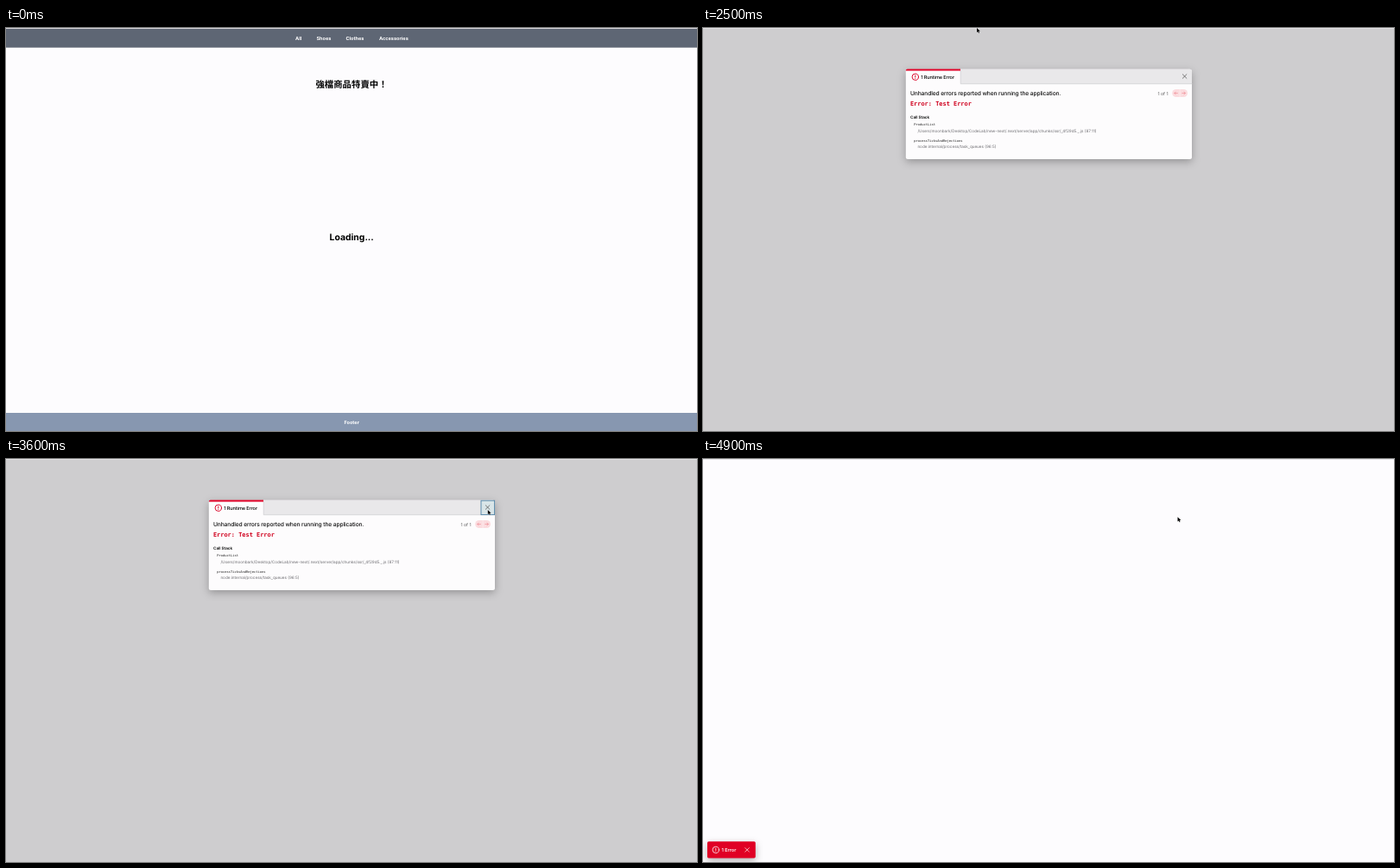
An HTML page for the animation above (5 s loop, 800 px wide and 467 px high).

```html
<!DOCTYPE html>
<html lang="zh-Hant">
<head>
<meta charset="utf-8">
<title>Error overlay</title>
<style>
  html, body { margin: 0; width: 100%; height: 100%; overflow: hidden; background: #fdfcfe; }
  svg { display: block; width: 800px; height: 467px; }
  text { font-family: Inter, sans-serif; text-rendering: geometricPrecision; white-space: pre; }
  .nav { font-size: 5.6px; font-weight: 700; fill: #fff; }
  .title { font: 700 10.4px "Noto Sans CJK TC", "Noto Sans CJK", sans-serif; }
  .loading { font-size: 10.4px; font-weight: 700; }
  .mid { text-anchor: middle; }
  .tab { font-size: 5.6px; font-weight: 500; letter-spacing: -.02em; }
  .lead { font-size: 6.7px; font-weight: 500; letter-spacing: -.02em; fill: #111; }
  .mono { font-family: "DejaVu Sans Mono", monospace; font-size: 3.75px; fill: #222; }
  .error { font-family: "DejaVu Sans Mono", monospace; font-size: 6.94px; font-weight: 700; fill: #d0021f; }
  .stack { font-size: 4.6px; font-weight: 600; }
  .path { font-size: 4.62px; fill: #6c6c70; }
  .count { font-size: 5.1px; fill: #555; }
  .toast { font-size: 5.5px; font-weight: 600; fill: #fff; }
  .line { fill: none; stroke-linecap: round; stroke-linejoin: round; }
  .panel { filter: drop-shadow(0 3px 5px rgba(0, 0, 0, .28)); }
  .badge { filter: drop-shadow(0 3px 4px rgba(0, 0, 0, .3)); }
</style>
</head>
<body>
<svg viewBox="0 0 800 467">
  <defs>
    <g id="alert" class="line">
      <circle r="3.7"/>
      <path d="M0-1.7V.3M0 1.6V1.7"/>
    </g>
    <path id="cross" class="line" d="M-2.3-2.3 2.3 2.3M2.3-2.3-2.3 2.3"/>
    <path id="arrow" class="line" d="M1.8 0H-1.8M-.3-1.5-1.8 0-.3 1.5"/>
  </defs>

  <rect width="800" height="467" fill="#fdfcfe"/>

  <g id="page">
    <rect width="800" height="22.7" fill="#5e6674"/>
    <g class="nav">
      <text x="335" y="14">All</text>
      <text x="359.4" y="14">Shoes</text>
      <text x="393.4" y="14">Clothes</text>
      <text x="431.9" y="14">Accessories</text>
    </g>
    <text class="title mid" x="400" y="68.8">強檔商品特賣中！</text>
    <text class="loading mid" x="400.2" y="246">Loading...</text>
    <rect y="446" width="800" height="21" fill="#8797b0"/>
    <text class="nav mid" x="400.2" y="459">Footer</text>
  </g>

  <g id="overlay">
    <rect width="800" height="467" fill="#cecdcf"/>
    <rect class="panel" x="234.8" y="47.8" width="331.2" height="104.2" rx="2.5" fill="#fdfcfd"/>
    <path d="M298 47.8H563.5a2.5 2.5 0 0 1 2.5 2.5V65H298Z" fill="#e9e8ea"/>
    <path d="M298.2 49V64.7H566" class="line" stroke="#d2d1d4" stroke-width=".7"/>
    <path d="M234.8 49.6V49.4a2 2 0 0 1 2-1.9H298V49.6Z" fill="#e00026"/>
    <use href="#alert" x="245.8" y="56.7" stroke="#d80024" stroke-width=".95"/>
    <text class="tab" x="252.2" y="58.7">1 Runtime Error</text>

    <rect id="focus" x="550" y="48.2" width="15.6" height="16.4" fill="#d9e5e8" stroke="#4f83a6" stroke-width=".9"/>
    <use href="#cross" x="557.6" y="56" stroke="#555" stroke-width=".75"/>

    <text class="lead" x="240" y="77.9">Unhandled errors reported when running the application.</text>
    <text class="count" x="526.5" y="77.6">1 of 1</text>
    <rect x="543.2" y="71" width="17.8" height="9" rx="4.5" fill="#fbdcdf"/>
    <path d="M552.1 71V80" stroke="#fdf0f1" stroke-width=".6"/>
    <g stroke="#f0959d" stroke-width=".75">
      <use href="#arrow" x="547.6" y="75.5"/>
      <use href="#arrow" transform="translate(556.6 75.5) scale(-1 1)"/>
    </g>

    <text class="error" x="239.9" y="90">Error: Test Error</text>
    <text class="stack" x="240" y="104.9">Call Stack</text>
    <text class="mono" x="244.2" y="113.2">ProductList</text>
    <text class="path" x="248.4" y="120.7">/Users/moonbark/Desktop/CodeLab/new-next/.next/server/app/chunks/ssr/_4f29d5._.js (87:11)</text>
    <text class="mono" x="244.2" y="131.7">processTicksAndRejections</text>
    <text class="path" x="248.4" y="139.1">node:internal/process/task_queues (96:5)</text>
  </g>

  <g id="toast">
    <rect class="badge" x="5" y="443.2" width="55.8" height="19.2" rx="1.6" fill="#e00025"/>
    <use href="#alert" x="14.8" y="452.9" stroke="#fff" stroke-width=".8"/>
    <text class="toast" x="21.5" y="455">1 Error</text>
    <use href="#cross" x="51.1" y="452.9" stroke="#fff" stroke-width=".65"/>
  </g>

  <rect width="800" height=".9" fill="#e5e4e7"/>
  <path id="cursor" d="M0 0V5.2L1.3 4.1 2.1 6 3 5.6 2.2 3.8H3.9Z" fill="#000" stroke="#fff" stroke-width=".5" paint-order="stroke"/>
</svg>

<script>
  const LOOP = 5000;
  const el = id => document.getElementById(id);

  // Visible spans: [from, to) in ms
  const spans = {
    page: [0, 1400],
    overlay: [1400, 3700],
    focus: [3500, 3700],
    toast: [3700, LOOP],
    cursor: [2500, LOOP]
  };

  // Pointer steps: time, x, y
  const steps = [
    [2500, 317, 0], [2600, 408, 11], [2700, 478.5, 18],
    [2900, 522.3, 18.2], [3000, 529, 26], [3100, 539, 38],
    [3200, 548, 49], [3300, 554.5, 56], [3400, 557.8, 59],
    [4000, 557.4, 59.6], [4100, 557, 60], [4400, 556.5, 60.2],
    [4700, 555, 61.6], [4800, 552, 64.6], [4900, 549.5, 67.3]
  ];

  function draw(t) {
    for (const [id, [from, to]] of Object.entries(spans)) {
      el(id).style.display = t >= from && t < to ? "" : "none";
    }
    const step = steps.filter(s => s[0] <= t).pop();
    if (step) el("cursor").setAttribute("transform", `translate(${step[1]} ${step[2]})`);
  }

  const start = performance.now();
  function tick() {
    draw((performance.now() - start) % LOOP);
    requestAnimationFrame(tick);
  }
  draw(0);
  requestAnimationFrame(tick);
</script>
</body>
</html>
```
